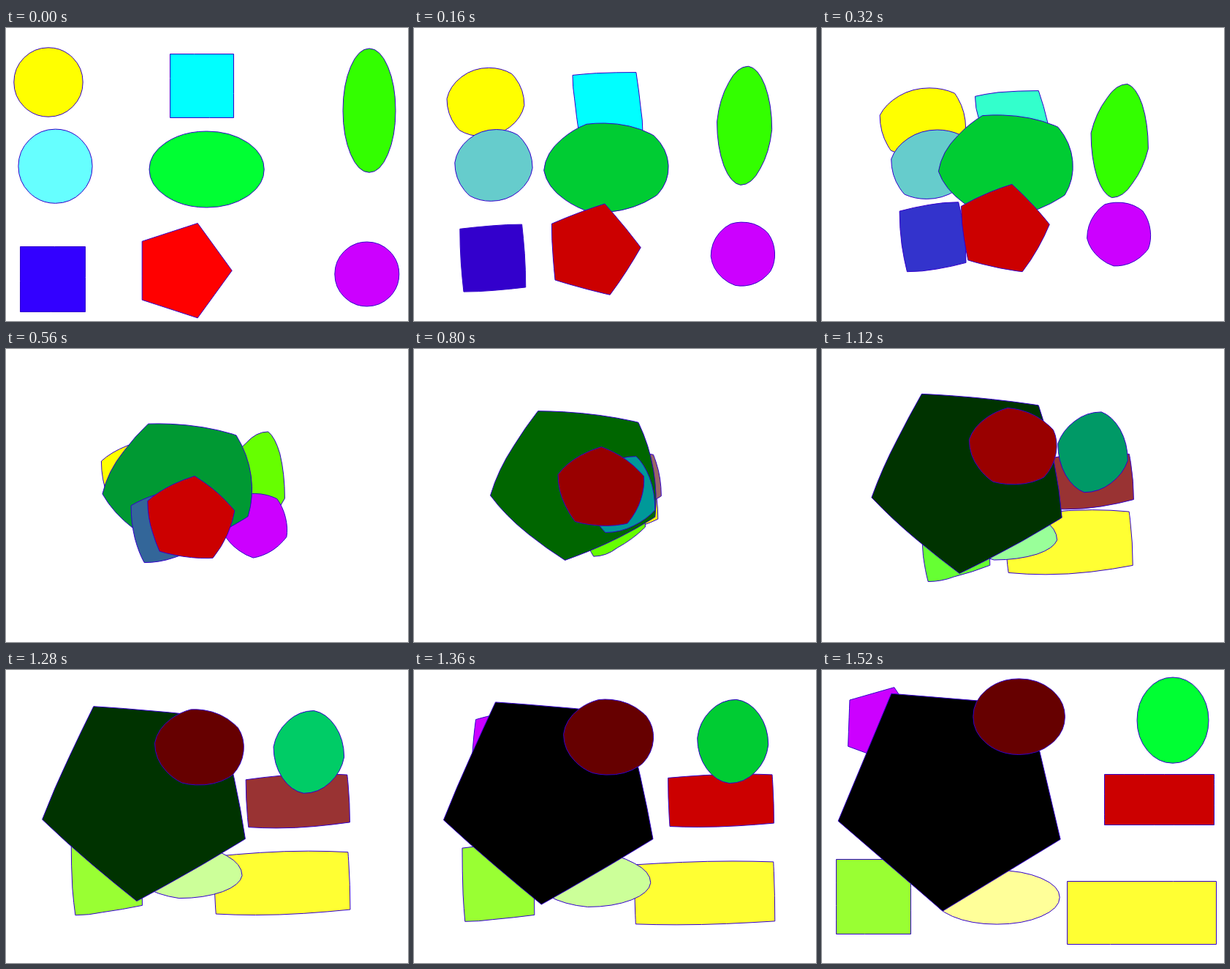
Write an HTML page that moves like this. It is 550 px wide and 400 px high and loops after 1.6 s.

```html
<!DOCTYPE html>
<html lang="en">
<head>
<meta charset="utf-8">
<title>Shape morph</title>
<style>
html, body { margin: 0; width: 100%; height: 100%; overflow: hidden; background: #fff; }
svg { display: block; width: 550px; height: 400px; }
path { stroke: #3300cc; stroke-width: 1; stroke-linejoin: round; }
</style>
</head>
<body>
<svg id="stage" viewBox="0 0 550 400"></svg>
<script>
const STEP = 80, COUNT = 20;
const mix = (a, b, t) => a + (b - a) * t;
const mixPt = (p, q, t) => [mix(p[0], q[0], t), mix(p[1], q[1], t)];
const dist = (p, q) => Math.hypot(q[0] - p[0], q[1] - p[1]);

// Every outline is a closed, clockwise list of quadratic pieces [from, control, to].
function ellipse(cx, cy, rx, ry = rx) {
  const at = (deg, k) => {
    const a = deg * Math.PI / 180;
    return [cx + rx * k * Math.cos(a), cy + ry * k * Math.sin(a)];
  };
  const bulge = 1 / Math.cos(Math.PI / 8);
  return Array.from({ length: 8 }, (_, i) => {
    const a = 180 + 45 * i;
    return [at(a, 1), at(a + 22.5, bulge), at(a + 45, 1)];
  });
}

function polygon(pts) {
  return pts.map((p, i) => {
    const q = pts[(i + 1) % pts.length];
    return [p, mixPt(p, q, 0.5), q];
  });
}

const rect = (l, t, r, b) => polygon([[l, t], [r, t], [r, b], [l, b]]);

function pentagon(cx, cy, r, deg) {
  return polygon([0, 1, 2, 3, 4].map(i => {
    const a = (deg + 72 * i) * Math.PI / 180;
    return [cx + r * Math.cos(a), cy + r * Math.sin(a)];
  }));
}

function pointOn([a, c, b], u) {
  return mixPt(mixPt(a, c, u), mixPt(c, b, u), u);
}

function pieceLength(piece) {
  let sum = 0;
  for (let i = 0; i < 16; i++) sum += dist(pointOn(piece, i / 16), pointOn(piece, (i + 1) / 16));
  return sum;
}

// Running share of the perimeter at each node: 0 ... 1
function nodeShares(pieces) {
  const lengths = pieces.map(pieceLength);
  const total = lengths.reduce((a, b) => a + b);
  let sum = 0;
  return [0, ...lengths.map(n => (sum += n) / total)];
}

// The part of a piece between parameters u and v.
function subPiece([a, c, b], u, v) {
  const control = mixPt(mixPt(a, c, u), mixPt(c, b, u), v);
  return [pointOn([a, c, b], u), control, pointOn([a, c, b], v)];
}

function cutAt(pieces, shares, cuts) {
  return cuts.slice(1).map((end, i) => {
    const start = cuts[i], mid = (start + end) / 2;
    const n = shares.findIndex((s, j) => mid >= s && mid < shares[j + 1]);
    const u = s => Math.min(1, Math.max(0, (s - shares[n]) / (shares[n + 1] - shares[n])));
    return subPiece(pieces[n], u(start), u(end));
  });
}

// Give both outlines the same nodes, matched by share of perimeter.
function pair(from, to) {
  const a = nodeShares(from), b = nodeShares(to);
  const cuts = [...a, ...b].sort((x, y) => x - y)
    .filter((s, i, all) => i === 0 || s - all[i - 1] > 1e-4);
  return [cutAt(from, a, cuts), cutAt(to, b, cuts)];
}

// Limits between neighbouring web-safe levels
const LIMITS = [30, 80, 130, 190, 240];
const webSafe = v => 51 * LIMITS.filter(n => v >= n).length;
const channels = hex => [1, 3, 5].map(i => parseInt(hex.slice(i, i + 2), 16));

// Back to front: start outline, end outline, start colour, end colour
const morphs = [
  [ellipse(58, 74, 47.2), rect(335.5, 288.5, 539.5, 374.5), '#ffff00', '#ffff33'],
  [ellipse(67.5, 188.7, 50.6), rect(386.5, 142.5, 536.5, 211.5), '#66ffff', '#cc0000'],
  [rect(224.5, 35.5, 311.5, 122.5), ellipse(239.2, 310.3, 86, 36.8), '#00ffff', '#ffff99'],
  [ellipse(497, 112.6, 36, 84.6), rect(19.5, 258.5, 121.5, 360.5), '#33ff00', '#99ff33'],
  [ellipse(493.8, 336, 44), pentagon(80.3, 74.2, 53.8, 146.1), '#cc00ff', '#cc00ff'],
  [ellipse(274.6, 193, 78.6, 52), pentagon(178.2, 169.3, 160.4, 166.7), '#00ff33', '#000000'],
  [rect(19.5, 298.5, 108.5, 387.5), ellipse(480, 68.6, 49, 58.6), '#3300ff', '#00ff33'],
  [pentagon(241.2, 331.2, 68, 216), ellipse(269.6, 63.7, 62.8, 51.8), '#ff0000', '#660000']
].map(([from, to, c1, c2]) => {
  const path = document.createElementNS('http://www.w3.org/2000/svg', 'path');
  document.getElementById('stage').append(path);
  const [a, b] = pair(from, to);
  return { path, a, b, c1: channels(c1), c2: channels(c2) };
});

const text = p => p.map(v => v.toFixed(2)).join(' ');

function draw(ms) {
  const t = Math.floor(ms / STEP) % COUNT / (COUNT - 1);
  for (const { path, a, b, c1, c2 } of morphs) {
    let d = 'M' + text(mixPt(a[0][0], b[0][0], t));
    a.forEach((p, i) => {
      d += 'Q' + text(mixPt(p[1], b[i][1], t)) + ' ' + text(mixPt(p[2], b[i][2], t));
    });
    path.setAttribute('d', d + 'Z');
    path.setAttribute('fill', `rgb(${c1.map((v, i) => webSafe(mix(v, c2[i], t)))})`);
  }
}

let begin = null;
function tick(now) {
  if (begin === null) begin = now;
  draw(Math.max(0, now - begin));
  requestAnimationFrame(tick);
}
draw(0);
requestAnimationFrame(tick);
</script>
</body>
</html>
```
